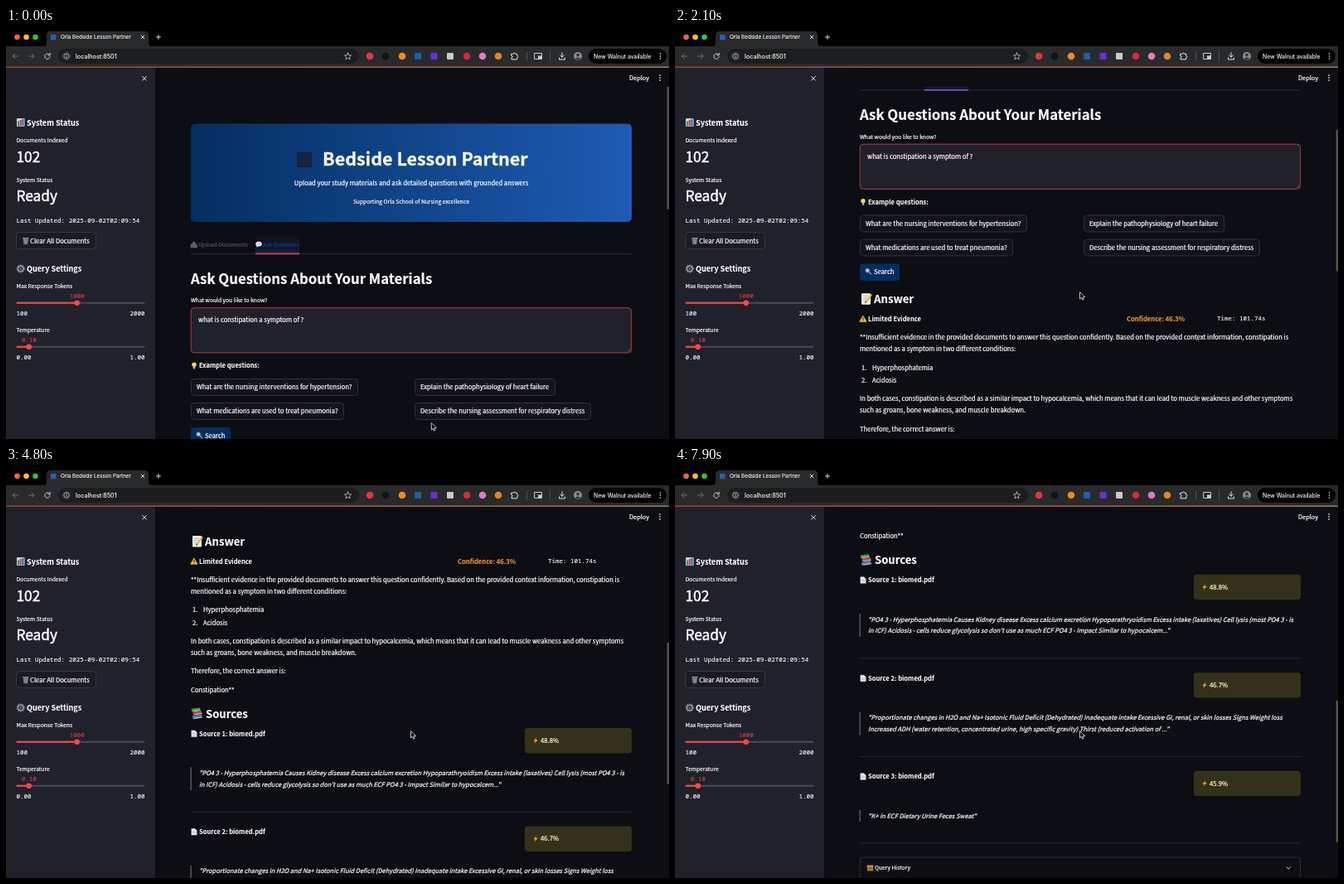
These frames come from a looping animation (800x496 px, 8 s). An HTML page:

```html
<!DOCTYPE html>
<html lang="en">
<head>
<meta charset="utf-8">
<title>Study app walkthrough</title>
<style>
html, body { margin: 0; width: 100%; height: 100%; overflow: hidden; background: #0d0e13; }
svg { display: block; width: 800px; height: 496px; }
text { font-family: "Noto Sans CJK JP", "Noto Sans CJK SC", "Noto Sans CJK", "Open Sans", sans-serif; white-space: pre; stroke-width: .03em; }
.ui { font-family: Inter, Roboto, sans-serif; stroke-width: .015em; }
.mono { font-family: "Noto Sans Mono", "DejaVu Sans Mono", monospace; stroke-width: .015em; }
.bold { font-weight: 600; stroke-width: .012em; }
.it { font-style: italic; }
</style>
</head>
<body>
<svg id="stage" viewBox="0 0 800 496" xmlns="http://www.w3.org/2000/svg"></svg>
<script>
const BODY = 7.66, SMALL = 6.7, QUOTE = 7.47, MONO = 7.53;
const WHITE = '#fdfdfe', PANEL = '#20212b', PAGE = '#0d0e13', RED = '#f9484a', BAR = '#292a2b';

// y is the middle of the capitals; a hairline stroke gives the text its weight
const text = (x, y, s, size = BODY, cls = '', fill = WHITE, anchor = 'start') =>
  `<text x="${x}" y="${(y + size * .365).toFixed(2)}" font-size="${size}" class="${cls}" fill="${fill}" stroke="${fill}" text-anchor="${anchor}">${s}</text>`;
const rect = (x, y, w, h, fill, rx = 0, stroke = 'none') =>
  `<rect x="${x}" y="${y}" width="${w}" height="${h}" rx="${rx}" fill="${fill}" stroke="${stroke}"/>`;
const dot = (x, y, r, fill) => `<circle cx="${x}" cy="${y}" r="${r}" fill="${fill}"/>`;
const path = (d, stroke, w = 1, fill = 'none') =>
  `<path d="${d}" fill="${fill}" stroke="${stroke}" stroke-width="${w}" stroke-linecap="round" stroke-linejoin="round"/>`;
const at = (x, y, s) => `<g transform="translate(${x} ${y})">${s}</g>`;
const cross = (x, y, r, c) => path(`M${x - r} ${y - r}l${2 * r} ${2 * r}m0 ${-2 * r}l${-2 * r} ${2 * r}`, c);
const button = (x, y, w, s) => rect(x + .5, y - 10, w - 1, 20, '#13141b', 4, '#31323a') + text(x + 7, y, s);

// Small pictograms, each centred on its own origin
const icon = {
  chart: rect(-4.8, -5, 9.6, 10, '#c9d3dc', 1) + rect(-3.8, -1.5, 2.2, 6, '#2f9e58') + rect(-1.1, -3, 2.2, 7.5, '#d8413c') + rect(1.6, -4.2, 2.2, 8.7, '#2f6fc4'),
  gear: `<circle r="3.9" fill="none" stroke="#858c93" stroke-width="2.2" stroke-dasharray="1.7 .75"/><circle r="3.2" fill="none" stroke="#979ea5" stroke-width="1.2"/>` + dot(0, 0, 1.2, '#7c838a'),
  trash: path('M-2.8 -2.5L-2 4H2L2.8 -2.5Z', '#8e959c', .7, '#5a6067') + path('M-3.4 -3.2H3.4M-.8 -1.5V3M.9 -1.5V3', '#aab0b6', .8),
  outbox: path('M-3.6 0V3.4H3.6V0L2 -1H-2Z', '#7f858c', .6, '#565b62') + path('M0 1V-3.4M-1.6 -2L0 -3.6L1.6 -2', '#5d7fae', 1),
  bubble: `<ellipse rx="3.7" ry="2.9" cy="-.4" fill="#f1f2f4"/>` + path('M-2.3 1.4L-3 3.4L-.4 2.2Z', 'none', 0, '#f1f2f4') + path('M-1.7 -.4h0M0 -.4h0M1.7 -.4h0', '#555', .9),
  bulb: dot(0, -1.2, 2.7, '#ffd75a') + rect(-1.2, 1.2, 2.4, 2.6, '#b9bcc2', .6),
  lens: dot(-.8, -.8, 2.4, '#b4d0e8') + `<circle cx="-.8" cy="-.8" r="2.4" fill="none" stroke="#6f7780"/>` + path('M1.2 1.2L3.4 3.4', '#8a919a', 1.5),
  memo: rect(-6, -6.5, 11, 13.5, '#f0efe9', 1) + path('M-4 -3.5H2M-4 -.8H1M-4 2H-1', '#9aa4b1', .8) + path('M5.6 -4.5L-.4 3.5', '#f2b13c', 2.3) + path('M-.6 3.7l-.7 1', '#4b3a2a', 1.2),
  warn: path('M0 -3.6L4 3.4H-4Z', '#f8b83a', .8, '#f8b83a') + path('M0 -1.4V.8M0 2.4h0', '#2a2110', 1),
  books: `<g transform="rotate(-8)">` + rect(-6, -6.3, 10.5, 3.6, '#4c9a52', .8) + rect(-5, -2.3, 11, 3.8, '#c2463f', .8) + rect(-6, 2, 11.5, 4.2, '#4080bd', .8) + path('M-4 -3.1H4M-3 1.1H5.5M-4 5.5H5', '#ece7d8', .8) + '</g>',
  page: path('M-3 -3.8H1L3.2 -1.6V3.8H-3Z', '#d2d5da', .5, '#eceef1') + path('M-1.8 -.4H2M-1.8 1.4H2', '#8d949d', .6),
  bolt: path('M1.4 -3.8L-2.6 .6H-.2L-1.4 3.8L2.7 -.8H.2Z', 'none', 0, '#fba62c'),
  crate: rect(-3.6, -2.4, 7.2, 5.8, '#a9753f', .5) + rect(-4, -3.6, 8, 2.2, '#c68f52', .4) + rect(-1.2, -.4, 2.4, 1.2, '#5a3c1e')
};
const pic = (name, x, y) => at(x, y, icon[name]);

function browser() {
  const grey = '#c9cacc', dim = '#6d6e70';
  const badges = [[439, 1, '#e0393e'], [458, 1, '#111213'], [478, 1, '#f08a24'], [497, 0, '#1f5fa8'], [516.5, 0, '#6a2fd0'],
    [536, 0, '#c9cacc'], [556, 1, '#d42b34'], [575, 1, '#dd7fb9'], [594, 1, '#e0862a']];
  return rect(0, 0, 800, 24, '#010101') + rect(0, 22, 800, 25, BAR) +
    path('M45 22Q49 22 49 18V9Q49 4 54 4H167Q172 4 172 9V18Q172 22 176 22Z', 'none', 0, BAR) +
    ['#ff5f57', '#febc2e', '#28c840'].map((c, i) => dot(13.5 + i * 11, 11, 3.3, c)).join('') +
    rect(54, 8, 6.5, 6.5, '#2a5db0') + text(66, 11, 'Orla Bedside Lesson Partner', 6.3, 'ui') +
    cross(165, 11, 1.8, '#dcdcdc') + path('M181.5 11h5M184 8.5v5', '#dcdcdc') +
    path('M14.5 34H8M11 31L8 34L11 37', dim) + path('M27.5 34H34M31 31L34 34L31 37', dim) +
    path('M52.6 32.2A3.2 3.2 0 1 0 53.2 34.6M53.2 30.4V32.8H50.8', grey) +
    rect(63, 25, 363, 18, '#1c1d1e', 9) + dot(73, 34, 5.8, BAR) +
    `<circle cx="73" cy="34" r="3.2" fill="none" stroke="${grey}" stroke-width=".8"/>` + path('M73 33.7v1.7M73 32.3h0', grey, .8) +
    text(84, 34, 'localhost:8501', 7.3, 'ui') +
    path('M412.5 30L413.7 32.8L416.6 33L414.4 35L415.1 37.9L412.5 36.3L409.9 37.9L410.6 35L408.4 33L411.3 32.8Z', grey, .8) +
    badges.map(([x, round, c]) => round ? dot(x, 34, 4.3, c) : rect(x - 4, 30, 8, 8, c, 1)).join('') +
    path('M610 31.3h2.3a1.2 1.2 0 1 1 2.4 0h2v2.2a1.2 1.2 0 1 1 0 2.4v2h-6.7v-2a1.2 1.2 0 1 0 0-2.4Z', '#e4e4e4', 1) +
    rect(628, 29, .8, 10, '#5f6062') + rect(656, 29, .8, 10, '#5f6062') +
    path('M638 30.5h8.5v7h-8.5Z', grey) + rect(642, 33.5, 4, 3.6, grey) +
    path('M671 29.8V35M668.7 33L671 35.3L673.3 33M667.5 36V38H674.5V36', '#e4e4e4') +
    dot(690, 34, 5, '#8b8d90') + dot(690, 32.6, 1.9, '#35373a') + path('M686.6 37Q690 33.8 693.4 37Q690 40 686.6 37Z', 'none', 0, '#35373a') +
    rect(703, 25, 94, 18, '#010101', 9) + text(709, 34, 'New Walnut available', 6.9, 'ui') +
    [31, 34, 37].map(y => dot(789.5, y, .8, WHITE)).join('') +
    rect(0, 46.6, 800, 1.3, 'url(#strip)');
}

function slider(y, label, value, knob, low, high) {
  return text(12.5, y, label, SMALL) + text(knob, y + 11, value, MONO, 'mono', '#d04041', 'middle') +
    rect(12.5, y + 18.8, 155, 2, '#4a4b54', 1) + rect(12.5, y + 18.8, knob - 12.5, 2, RED, 1) + dot(knob, y + 19.8, 3.3, RED) +
    text(12.5, y + 32, low, MONO, 'mono') + text(167.5, y + 32, high, MONO, 'mono', WHITE, 'end');
}

function sidebar() {
  return rect(0, 48, 180, 448, PANEL) + cross(167, 60.8, 2.4, '#e8e8ea') +
    pic('chart', 17.7, 114) + text(25, 114.5, 'System Status', 9.1, 'bold') +
    text(12.5, 136, 'Documents Indexed', SMALL) + text(12.5, 155.5, '102', 17.27) +
    text(12.5, 184, 'System Status', SMALL) + text(12.5, 203, 'Ready', 17.27) +
    text(12.5, 232, 'Last Updated: 2025-09-02T02:09:54', MONO, 'mono') +
    rect(12.5, 246.5, 96, 20, '#1a1b23', 4, '#363740') + pic('trash', 23.8, 256.8) + text(29, 257, 'Clear All Documents') +
    pic('gear', 17.7, 290.5) + text(25, 291, 'Query Settings', 9.1, 'bold') +
    slider(312, 'Max Response Tokens', '1000', 85.7, '100', '2000') +
    slider(365, 'Temperature', '0.10', 27.7, '0.00', '1.00');
}

function source(n, y, score, lines) {
  const h = lines.length * 14;
  return pic('page', 227, y) + text(233, y, `Source ${n}: biomed.pdf`, 7.6, 'bold') +
    rect(626, y - 6.7, 129, 30.3, '#34311b', 4) + pic('bolt', 639, y + 8.3) + text(645, y + 8.3, score, BODY, '', '#fdfbd0') +
    rect(222.6, y + 40.5, 1, h, '#7b7c83') +
    lines.map((s, i) => text(233, y + 47.3 + i * 13.9, s, QUOTE, 'it')).join('') +
    rect(223, y + 66 + h, 532, .8, '#2b2c34');
}

function page() {
  const para = (y, ...lines) => lines.map((s, i) => text(223, y + i * 14, s)).join('');
  return rect(223, 115.5, 532, 118.5, 'url(#banner)', 5) + rect(351, 150, 18, 18, '#14233f') +
    text(382, 158.5, 'Bedside Lesson Partner', 21.5, 'bold') +
    text(489, 187, 'Upload your study materials and ask detailed questions with grounded answers', BODY, '', WHITE, 'middle') +
    text(489, 210, 'Supporting Orla School of Nursing excellence', SMALL, '', WHITE, 'middle') +
    pic('outbox', 226.7, 261.5) + text(232, 262, 'Upload Documents', SMALL, '', '#55565d') +
    rect(301, 251, 53, 21, 'url(#tab)', 2) + pic('bubble', 305, 261) + text(310, 261.5, 'Ask Questions', SMALL, '', '#173c80') +
    rect(223, 272, 532, .8, '#30313a') + `<rect id="line" x="301" y="271.5" width="53" height="1.8"/>` +
    text(223, 302.5, 'Ask Questions About Your Materials', 16.8, 'bold') +
    text(223, 329, 'What would you like to know?', SMALL) +
    rect(223.2, 337.7, 531.4, 54.2, PANEL, 4, '#b8383d') + path('M750.5 390l2.5-2.5M752 390.4l1-1', '#8b8c92', .5) +
    text(232, 352.5, 'what is constipation a symptom of ?') +
    pic('bulb', 227, 407.5) + text(233, 407.5, 'Example questions:', 7.6, 'bold') +
    button(223, 433.5, 202, 'What are the nursing interventions for hypertension?') +
    button(493, 433.5, 170, 'Explain the pathophysiology of heart failure') +
    button(223, 462.5, 185, 'What medications are used to treat pneumonia?') +
    button(493, 462.5, 213, 'Describe the nursing assessment for respiratory distress') +
    rect(223, 482, 48, 20.4, '#042d5f', 4) + pic('lens', 233, 491) + text(240, 492, 'Search') +
    pic('memo', 231, 524.3) + text(240, 525, 'Answer', 13.2, 'bold') +
    pic('warn', 227, 548.5) + text(233, 549, 'Limited Evidence', 7.6, 'bold') +
    text(545, 549, 'Confidence: 46.3%', BODY, 'bold', '#f29a35') + text(654, 548.2, 'Time: 101.74s', MONO, 'mono') +
    para(571, '**Insufficient evidence in the provided documents to answer this question confidently. Based on the provided context information, constipation is',
      'mentioned as a symptom in two different conditions:') +
    text(225, 607.3, '1.') + text(238, 607.3, 'Hyperphosphatemia') + text(225, 622.7, '2.') + text(238, 622.7, 'Acidosis') +
    para(645, 'In both cases, constipation is described as a similar impact to hypocalcemia, which means that it can lead to muscle weakness and other symptoms',
      'such as groans, bone weakness, and muscle breakdown.') +
    para(681.2, 'Therefore, the correct answer is:') + para(703.6, 'Constipation**') +
    pic('books', 230.5, 732) + text(241, 732.5, 'Sources', 13.1, 'bold') +
    source(1, 756.5, '48.8%', ['"PO4 3 - Hyperphosphatemia Causes Kidney disease Excess calcium excretion Hypoparathryoidism Excess intake (laxatives) Cell lysis (most PO4 3 - is',
      'in ICF) Acidosis - cells reduce glycolysis so don’t use as much ECF PO4 3 - Impact Similar to hypocalcem..."']) +
    source(2, 875, '46.7%', ['"Proportionate changes in H2O and Na+ Isotonic Fluid Deficit (Dehydrated) Inadequate intake Excessive GI, renal, or skin losses Signs Weight loss',
      'Increased ADH (water retention, concentrated urine, high specific gravity) Thirst (reduced activation of ..."']) +
    source(3, 993.5, '45.9%', ['"K+ in ECF Dietary Urine Feces Sweat"']) +
    rect(223.2, 1091, 531.4, 27, '#0e0f14', 4, '#30313a') + pic('crate', 235.5, 1104) + text(241, 1104, 'Query History', SMALL) +
    path('M738 1102.8l2.3 2.3l2.3 -2.3', '#d8d8dc');
}

const stops = (id, a, b, extra = '') =>
  `<linearGradient id="${id}" ${extra}><stop stop-color="${a}"/><stop offset="1" stop-color="${b}"/></linearGradient>`;

document.getElementById('stage').innerHTML =
  `<defs>${stops('banner', '#032f60', '#1f5bb4')}${stops('strip', '#b0493f', '#b58a68')}` +
  stops('tab', '#0d111b', '#0d1d3d', 'x2="0" y2="1"') +
  `<clipPath id="view"><rect x="180" y="71" width="620" height="425"/></clipPath></defs>` +
  rect(0, 0, 800, 496, PAGE) +
  `<g clip-path="url(#view)"><g id="page">${page()}</g><rect id="thumb" x="797.6" width="2.4" height="171" rx="1.2" fill="#55565a"/></g>` +
  text(752, 60, 'Deploy', 7.4) + [57, 60, 63].map(y => dot(789, y, .85, WHITE)).join('') +
  sidebar() + browser() +
  `<g id="arrow">${path('M0 0V8L1.9 6.3L3.1 9.1L4.5 8.5L3.3 5.8H5.8Z', '#f2f2f2', .8, '#050505')}</g>` +
  `<g id="beam">${path('M-1.8 -3.8Q0 -3.8 0 -2.8Q0 -3.8 1.8 -3.8M0 -3V3M-1.8 3.8Q0 3.8 0 2.8Q0 3.8 1.8 3.8M-1 .9H1', '#d6d6d8', .9)}</g>`;

// [time, value] steps
const SCROLL = [[400, 0], [800, 30], [900, 30], [1600, 89], [2100, 197.5], [3000, 336.5], [4800, 434.7], [6700, 527.8], [7900, 620]];
const MOVE = [[0, 0], [100, .35], [200, .8], [300, 1]];

function sample(keys, t) {
  const i = keys.findIndex(k => k[0] >= t);
  if (i === 0) return keys[0][1];
  if (i < 0) return keys[keys.length - 1][1];
  const [t0, a] = keys[i - 1], [t1, b] = keys[i];
  return a + (b - a) * (t - t0) / (t1 - t0);
}

const get = id => document.getElementById(id);
const parts = { page: get('page'), thumb: get('thumb'), line: get('line'), arrow: get('arrow'), beam: get('beam') };
const place = (node, x, y) => node.setAttribute('transform', `translate(${x} ${y})`);

function draw(now) {
  const t = Math.floor((now % 8000) / 100) * 100;
  const scroll = sample(SCROLL, t), move = sample(MOVE, t);
  const overText = t >= 2900 && t <= 3300;
  place(parts.page, 0, -scroll);
  parts.thumb.setAttribute('y', 48 + scroll * .377);
  parts.line.setAttribute('fill', t < 1800 ? '#d9434a' : '#7b4ab4');
  place(parts.arrow, 513.3 - 24.8 * move, 477 - 158 * move);
  place(parts.beam, 488.5, 320);
  parts.arrow.style.display = overText ? 'none' : '';
  parts.beam.style.display = overText ? '' : 'none';
}

const start = performance.now();
function tick() {
  draw(performance.now() - start);
  requestAnimationFrame(tick);
}
tick();
</script>
</body>
</html>
```
